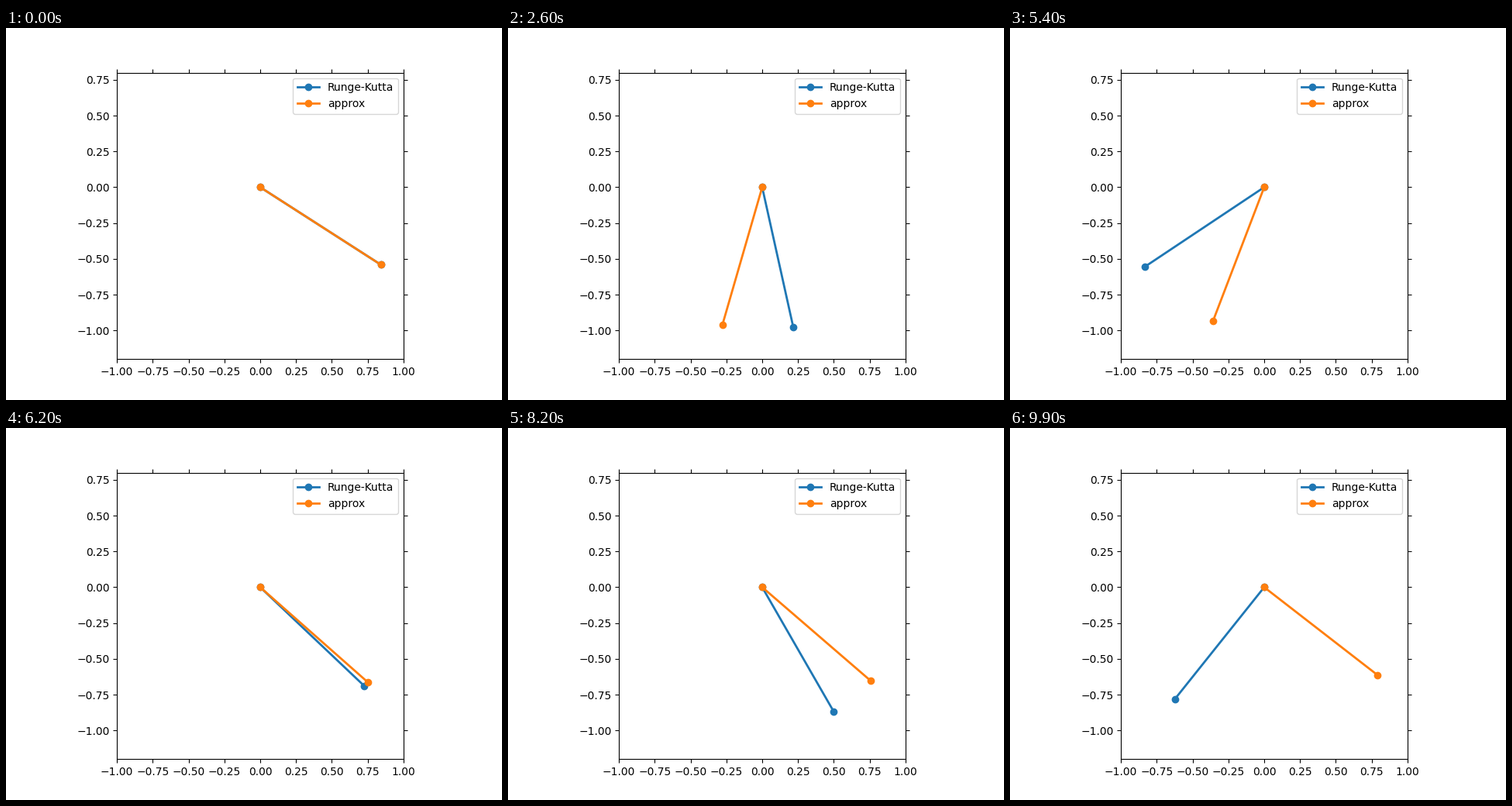
Recreate the animation shown at these times as a matplotlib script. Size 640 px wide and 480 px high, loop 10000 ms.

```python
import numpy as np
import matplotlib.pyplot as plt
from matplotlib.animation import FuncAnimation

G, LENGTH = 9.8, 1.0
THETA0 = 1.0
DT, T_END = 0.1, 10.0
RTOL, ATOL = 1e-3, 1e-6

# Dormand-Prince 5(4): stages, weights, error weights, dense output
A = [
    [],
    [1/5],
    [3/40, 9/40],
    [44/45, -56/15, 32/9],
    [19372/6561, -25360/2187, 64448/6561, -212/729],
    [9017/3168, -355/33, 46732/5247, 49/176, -5103/18656],
]
B = np.array([35/384, 0, 500/1113, 125/192, -2187/6784, 11/84])
E = np.array([-71/57600, 0, 71/16695, -71/1920, 17253/339200, -22/525, 1/40])
P = np.array([
    [1, -8048581381/2820520608, 8663915743/2820520608, -12715105075/11282082432],
    [0, 0, 0, 0],
    [0, 131558114200/32700410799, -68118460800/10900136933, 87487479700/32700410799],
    [0, -1754552775/470086768, 14199869525/1410260304, -10690763975/1880347072],
    [0, 127303824393/49829197408, -318862633887/49829197408, 701980252875/199316789632],
    [0, -282668133/205662961, 2019193451/616988883, -1453857185/822651844],
    [0, 40617522/29380423, -110615467/29380423, 69997945/29380423],
])


def deriv(y):
    return np.array([y[1], -G / LENGTH * np.sin(y[0])])


def rms(v):
    return np.sqrt(np.mean(v ** 2))


def first_step(y, f):
    scale = ATOL + np.abs(y) * RTOL
    d0, d1 = rms(y / scale), rms(f / scale)
    h0 = 0.01 * d0 / d1
    d2 = rms((deriv(y + h0 * f) - f) / scale) / h0
    return min(100 * h0, (0.01 / max(d1, d2)) ** 0.2)


def rk_step(y, f, h):
    k = [f]
    for row in A[1:]:
        k.append(deriv(y + h * np.dot(row, k)))
    y_new = y + h * (B @ np.array(k))
    k.append(deriv(y_new))
    return y_new, np.array(k)


def integrate(y, times):
    """Adaptive Runge-Kutta; returns the angle at each of the times."""
    t, f = 0.0, deriv(y)
    h = first_step(y, f)
    angles = np.full(len(times), y[0])
    rejected = False
    while t < T_END:
        t_new = min(t + h, T_END)
        h = t_new - t
        y_new, k = rk_step(y, f, h)
        scale = ATOL + np.maximum(np.abs(y), np.abs(y_new)) * RTOL
        err = max(rms(h * (E @ k) / scale), 1e-12)
        factor = 0.9 * err ** -0.2
        if err >= 1:
            h *= max(0.2, factor)
            rejected = True
            continue
        inside = (times > t) & (times <= t_new)
        x = (times[inside] - t) / h
        powers = np.array([x, x ** 2, x ** 3, x ** 4])
        angles[inside] = y[0] + h * (k[:, 0] @ P @ powers)
        h *= min(1.0 if rejected else 10.0, factor)
        rejected = False
        t, y, f = t_new, y_new, k[-1]
    return angles


times = np.arange(0, T_END - DT / 2, DT)
exact = integrate(np.array([THETA0, 0.0]), times)
approx = THETA0 * np.cos(np.sqrt(G / LENGTH) * times)

fig = plt.figure(figsize=(6.4, 4.8), dpi=100)
ax = fig.add_subplot(111, aspect="equal", autoscale_on=False,
                     xlim=(-1, 1), ylim=(-1.2, 0.8))
ax.tick_params(top=True, right=True)
rods = [ax.plot([], [], "o-", lw=2, label=name)[0]
        for name in ("Runge-Kutta", "approx")]
ax.legend(loc="upper right")


def update(i):
    for rod, angles in zip(rods, (exact, approx)):
        rod.set_data([0, LENGTH * np.sin(angles[i])],
                     [0, -LENGTH * np.cos(angles[i])])
    return rods


anim = FuncAnimation(fig, update, frames=len(times), interval=1000 * DT,
                     repeat=True, repeat_delay=0)
plt.show()
```
